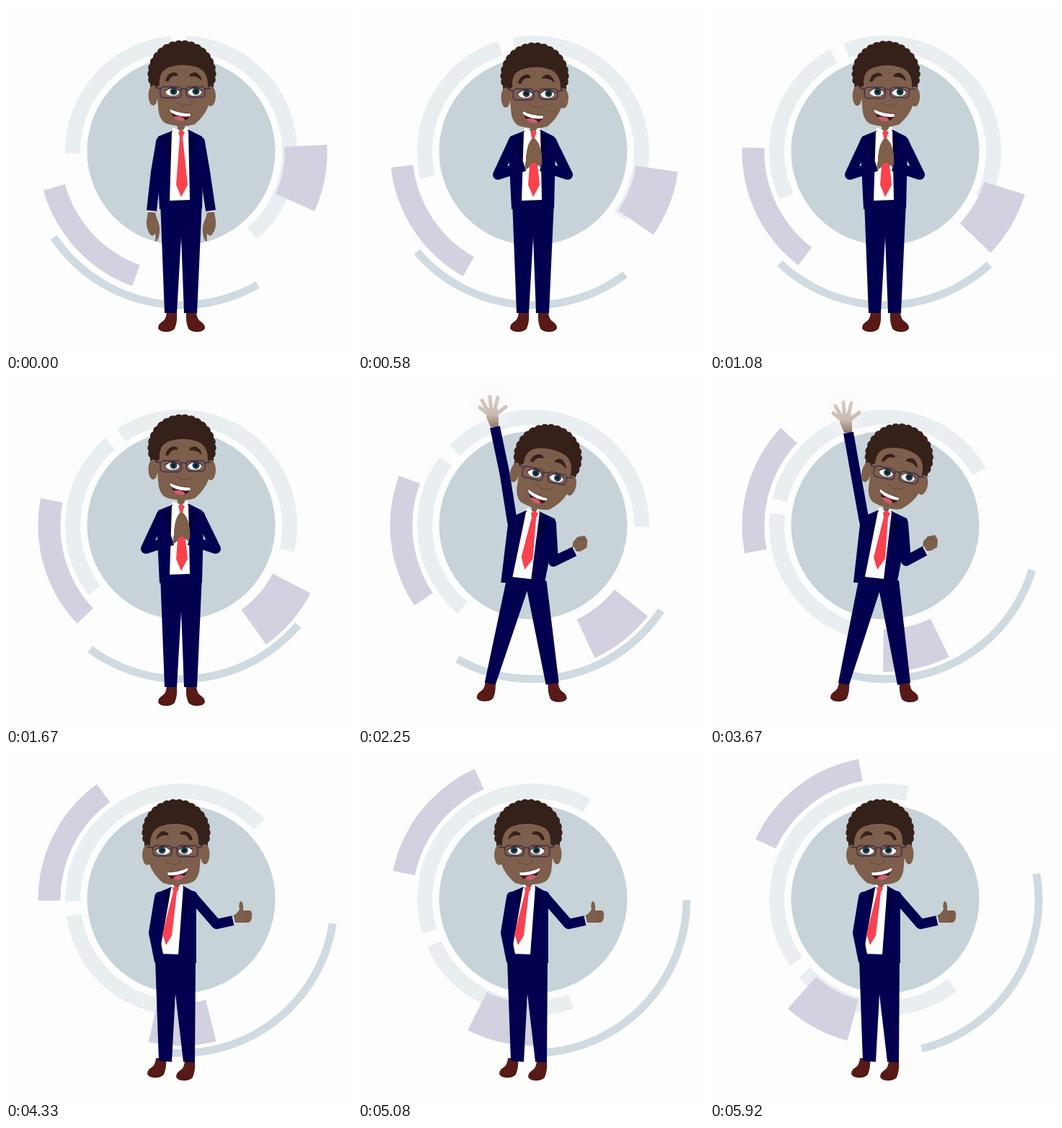
An HTML page with a canvas that plays this animation: 480x480 px, repeating every 6010 ms.

```html
<!DOCTYPE html>
<html lang="en">
<head>
<meta charset="utf-8">
<title>Gestures</title>
<style>
html, body { margin: 0; width: 100%; height: 100%; overflow: hidden; background: #fdfdfd; }
canvas { display: block; width: 100vmin; height: 100vmin; }
</style>
</head>
<body>
<canvas id="stage" width="480" height="480"></canvas>
<script>
const ctx = document.getElementById('stage').getContext('2d');
const LOOP = 6010, STEP = 1000 / 12, RAD = Math.PI / 180;
const NAVY = '#03004f', LAPEL = '#02002f', SKIN = '#7d5f4b', SHADE = '#65493a',
      HAIR = '#36201a', SHOE = '#571a17', TIE = '#fa424f', WHITE = '#fefefe';

// arms: shoulder, elbow, wrist. feet: x, y, direction. head: neck x, y, tilt, flip.
const STAND = {
  legs: [214,270, 272,270, 265,426, 247,426, 243,320, 237,426, 220,426],
  coat: [231,173, 211,181, 209,200, 213,282, 272,281, 274,200, 272,181, 254,172],
  shirt: [230,174, 253,173, 255,269, 227,270],
  tie: [239,175, 243,172, 248,175, 245,182, 252,248, 243,265, 236,248, 241,182],
  left: [215,189, 208,230, 202,284],
  right: [269,189, 276,230, 284,284],
  feet: [230,427,-1, 257,427,1],
  head: [243,168,0,1],
  hands: ['down', 'down']
};
const CLASP = { ...STAND,
  left: [215,189, 194,234, 231,222],
  right: [269,189, 291,234, 254,222],
  hands: ['clasp', 'clasp']
};
const WAVE = {
  legs: [206,278, 262,278, 278,420, 260,423, 235,294, 193,423, 178,420],
  coat: [232,181, 214,189, 208,200, 199,281, 259,284, 275,200, 273,192, 252,182],
  shirt: [233,182, 252,183, 241,276, 215,273],
  tie: [240,184, 245,181, 250,185, 247,191, 243,248, 232,263, 227,246, 241,190],
  left: [214,196, 203,135, 192,73],
  right: [268,199, 272,251, 298,237],
  feet: [186,421,-1, 270,422,1],
  head: [246,179,12,1],
  hands: ['wave', 'fist']
};
const THUMB = {
  legs: [207,285, 263,285, 262,428, 246,427, 235,333, 230,427, 212,426],
  coat: [228,185, 209,193, 204,220, 208,293, 264,290, 264,215, 264,193, 246,183],
  shirt: [229,186, 246,184, 239,278, 213,277],
  tie: [231,186, 235,183, 240,187, 237,192, 230,252, 222,265, 217,250, 232,191],
  left: [213,199, 205,248, 213,288],
  right: [259,198, 292,236, 315,231],
  feet: [215,424,-1, 255,428,-1],
  head: [237,183,0,-1],
  hands: ['pocket', 'thumb']
};

const mix = (a, b, p) => a.map((v, i) => typeof v === 'number' ? v + (b[i] - v) * p : p < 0.5 ? v : b[i]);

function blend(a, b, p) {
  const pose = {};
  for (const key in a) pose[key] = mix(a[key], b[key], p);
  pose.head[3] = (p < 0.5 ? a : b).head[3];
  return pose;
}

const ease = p => p * p * (3 - 2 * p);
function overshoot(p) {
  const q = p - 1;
  return 1 + 2.2 * q * q * q + 1.2 * q * q;
}
const progress = (t, start, length) => Math.min(1, Math.max(0, (t - start) / length));

function poseAt(t) {
  if (t <= 2010) {
    const pose = blend(STAND, CLASP, ease(progress(t, 0, 420)));
    const dip = Math.sin(Math.PI * progress(t, 0, 1160));
    pose.head[0] += dip;
    pose.head[1] += 3 * dip;
    return pose;
  }
  if (t <= 4010) return blend(CLASP, WAVE, overshoot(progress(t, 2000, 400)));
  return blend(WAVE, THUMB, ease(progress(t, 4000, 260)));
}

function poly(pts, color) {
  ctx.beginPath();
  for (let i = 0; i < pts.length; i += 2) ctx.lineTo(pts[i], pts[i + 1]);
  ctx.closePath();
  ctx.fillStyle = color;
  ctx.fill();
}
function line(pts, width, color, cap = 'round') {
  ctx.beginPath();
  for (let i = 0; i < pts.length; i += 2) ctx.lineTo(pts[i], pts[i + 1]);
  ctx.lineWidth = width;
  ctx.lineCap = cap;
  ctx.lineJoin = 'round';
  ctx.strokeStyle = color;
  ctx.stroke();
}
function oval(x, y, rx, ry, color) {
  ctx.beginPath();
  ctx.ellipse(x, y, rx, ry, 0, 0, 2 * Math.PI);
  ctx.fillStyle = color;
  ctx.fill();
}
function shape(d, color) {
  ctx.fillStyle = color;
  ctx.fill(new Path2D(d));
}
function curve(d, width, color) {
  ctx.lineWidth = width;
  ctx.lineCap = 'round';
  ctx.strokeStyle = color;
  ctx.stroke(new Path2D(d));
}

function band(inner, outer, start, span, color) {
  ctx.beginPath();
  ctx.arc(243, 202, outer, start * RAD, (start + span) * RAD);
  ctx.arc(243, 202, inner, (start + span) * RAD, start * RAD, true);
  ctx.closePath();
  ctx.fillStyle = color;
  ctx.fill();
}

function backdrop(s) {
  oval(243, 201.5, 130.5, 130.5, '#c7d3d9');
  band(140, 161, 272.3 - 21.5 * s, 136.7, '#e9eef1');
  band(140, 161, 179 - 21.5 * s, 86, '#e9eef1');
  band(207.5, 218.3, 60.1 - 11.8 * s, 86, '#cfdae1');
  band(143.5, 202.7, -2.7 + 18.2 * s, 26.8, '#d3d1e0');
  band(167.5, 198.5, 110 + 16.05 * s, 54.3, '#d3d1e0');
}

function shoe(x, y, dir) {
  ctx.save();
  ctx.translate(x, y);
  ctx.scale(dir < 0 ? -1 : 1, 1);
  shape('M-7 -2H7Q8 7 12 10Q19 14 19 20Q17 25 8 25Q-1 25-4 20Q-8 12-7 -2Z', SHOE);
  curve('M-4 20Q0 24 8 24', 1, '#3b100f');
  ctx.restore();
}

function hand(kind, x, y, side) {
  ctx.save();
  ctx.translate(x, y);
  if (kind === 'down') {
    ctx.scale(side, 1);
    shape('M-5 2H5Q6 8 9 15Q13 24 10 36Q8 44 5 42Q6 37 5 31Q3 36-1 34Q-8 26-7 14Z', SKIN);
  } else if (kind === 'clasp' && side > 0) {
    shape('M0 6Q2 -12 8 -30Q11 -40 14 -38Q20 -33 23 -17Q26 -4 22 2Q12 -12 6 2Z', SKIN);
    shape('M2 -10Q4 -35 12 -38Q21 -36 24 -14Q23 -2 18 -1Q12 -12 4 2Z', SKIN);
  } else if (kind === 'wave') {
    const glow = ctx.createRadialGradient(-6, -27, 4, -6, -27, 34);
    glow.addColorStop(0, 'rgba(250,248,247,.8)');
    glow.addColorStop(1, 'rgba(250,248,247,0)');
    oval(-6, -27, 34, 34, glow);
    const tint = ctx.createLinearGradient(0, -44, 0, 0);
    tint.addColorStop(0, '#d8ccc6');
    tint.addColorStop(0.6, '#c9bbb3');
    tint.addColorStop(1, '#92796a');
    poly([-6,0, 5,0, 5,-12, 4,-26, -10,-27, -12,-14], tint);
    [[-21,-27], [-18,-37], [-7,-42], [4,-41], [15,-28]].forEach(([fx, fy]) =>
      line([-3 + fx * 0.2, -16, fx, fy], 5, tint));
  } else if (kind === 'fist') {
    shape('M-2 -13L4 -20L14 -22L16 -19L18 -15L17 -5L8 0L2 0L-3 -5Z', SKIN);
    curve('M7 -17L14 -16', 1, SHADE);
  } else if (kind === 'thumb') {
    shape('M-1 -6Q5 -9 9 -15Q7 -25 11 -27Q15 -25 14 -14L24 -14Q27 -11 26 -6Q26 2 21 3L1 3Z', SKIN);
    curve('M17 -9H25M17 -4H25M17 0H23', 0.8, SHADE);
  }
  ctx.restore();
}

function arm(joints, kind, side) {
  const [sx, sy, ex, ey, wx, wy] = joints;
  hand(kind, wx, wy, side);
  if (kind === 'down' || kind === 'fist' || kind === 'thumb') {
    const len = Math.hypot(wx - ex, wy - ey) / 2;
    line([ex, ey, wx + (wx - ex) / len, wy + (wy - ey) / len], 12, '#e9e9f2', 'butt');
  }
  oval(sx, sy, 7, 8, NAVY);
  line(joints, 14, NAVY, 'butt');
}

function head([x, y, tilt, flip]) {
  ctx.save();
  ctx.translate(x, y);
  ctx.rotate(tilt * RAD);
  ctx.scale(flip, 1);
  ctx.translate(-243, -168);

  oval(244, 92, 42, 40, HAIR);
  for (let a = 156; a <= 384; a += 12)
    oval(244 + 41 * Math.cos(a * RAD), 94 + 40 * Math.sin(a * RAD), 6.7, 6.7, HAIR);
  oval(204, 124, 6.5, 14, SKIN);
  oval(284, 125, 7, 14, SKIN);
  shape('M213 110Q211 88 230 84Q247 79 265 85Q279 90 280 108L281 138Q276 152 262 164Q245 170 222 163Q212 158 211 140L209 112Z', SKIN);
  curve('M232 89Q246 86 261 89M236 94Q247 91 257 93', 0.5, '#71543f');

  shape('M221 104Q224 92 234 92Q239 93 238 97Q229 95 225 105Z', HAIR);
  shape('M254 98Q255 92 263 92Q271 96 272 104Q264 96 254 98Z', HAIR);

  for (const ex of [231, 262]) {
    oval(ex, 119, 9.5, 5.5, WHITE);
    oval(ex + 1.5, 118.5, 5, 5, '#204858');
    oval(ex + 1.5, 118.5, 2.5, 2.5, '#0b1c25');
    curve(`M${ex - 10} 118Q${ex} 109 ${ex + 10} 118`, 1.3, HAIR);
  }
  ctx.strokeStyle = '#3d2b52';
  ctx.lineWidth = 1.4;
  ctx.beginPath();
  ctx.roundRect(214, 112, 29, 15.5, 5);
  ctx.roundRect(250, 112, 26, 14.5, 5);
  ctx.stroke();
  curve('M243 116Q246 113 250 116M214 115L208 113M276 115L284 114', 1.4, '#3d2b52');

  curve('M236 135Q239 133 241 136Q246 140 251 137Q257 139 259 133', 1, SHADE);

  const mouth = 'M227 142Q240 149 256 149Q255 159 242 160Q231 158 227 142Z';
  ctx.save();
  ctx.clip(new Path2D(mouth));
  shape(mouth, '#45131a');
  oval(238, 158, 10, 5, '#c95e70');
  shape('M225 141Q240 149 258 149L256 153Q239 155 228 147Z', WHITE);
  ctx.restore();
  curve('M226 142Q240 149 257 149', 0.8, '#553527');
  ctx.restore();
}

function person(pose) {
  const [lx, ly, ld, rx, ry, rd] = pose.feet;
  shoe(lx, ly, ld);
  shoe(rx, ry, rd);
  poly(pose.legs, NAVY);
  poly(pose.coat, NAVY);
  const [ax, ay, bx, by] = pose.shirt;
  poly([ax - 2, ay + 4, ax - 9, ay + 17, ax - 6, ay + 22, ax - 3, ay + 50], LAPEL);
  poly([bx + 2, by + 4, bx + 9, by + 17, bx + 6, by + 22, bx + 1, by + 50], LAPEL);
  poly(pose.shirt, WHITE);
  const [nx, ny] = pose.head;
  poly([nx - 6, ny - 8, nx + 7, ny - 8, nx + 4, ny + 4, nx, ny + 7, nx - 5, ny + 2], SKIN);
  poly([ax, ay - 4, ax + 3, ay - 5, nx, ny + 6, ax + 5, ay + 9], WHITE);
  poly([bx, by - 4, bx - 3, by - 5, nx, ny + 6, bx - 4, by + 9], WHITE);
  poly(pose.tie, TIE);
  // the clasped hands hang from the left wrist and sit above both sleeves
  const [leftHand, rightHand] = pose.hands;
  arm(pose.left, leftHand, 1);
  arm(pose.right, rightHand, -1);
  if (leftHand === 'clasp') hand('clasp', pose.left[4], pose.left[5], 1);
  head(pose.head);
}

function draw(now) {
  const frame = Math.min(71, Math.floor((now % LOOP + 5) / STEP));
  const t = frame * STEP;
  ctx.fillStyle = '#fdfdfd';
  ctx.fillRect(0, 0, 480, 480);
  backdrop(t / 1000);
  person(poseAt(t));
}

let origin;
function tick(now) {
  origin ??= now;
  draw(now - origin);
  requestAnimationFrame(tick);
}
draw(0);
requestAnimationFrame(tick);
</script>
</body>
</html>
```
